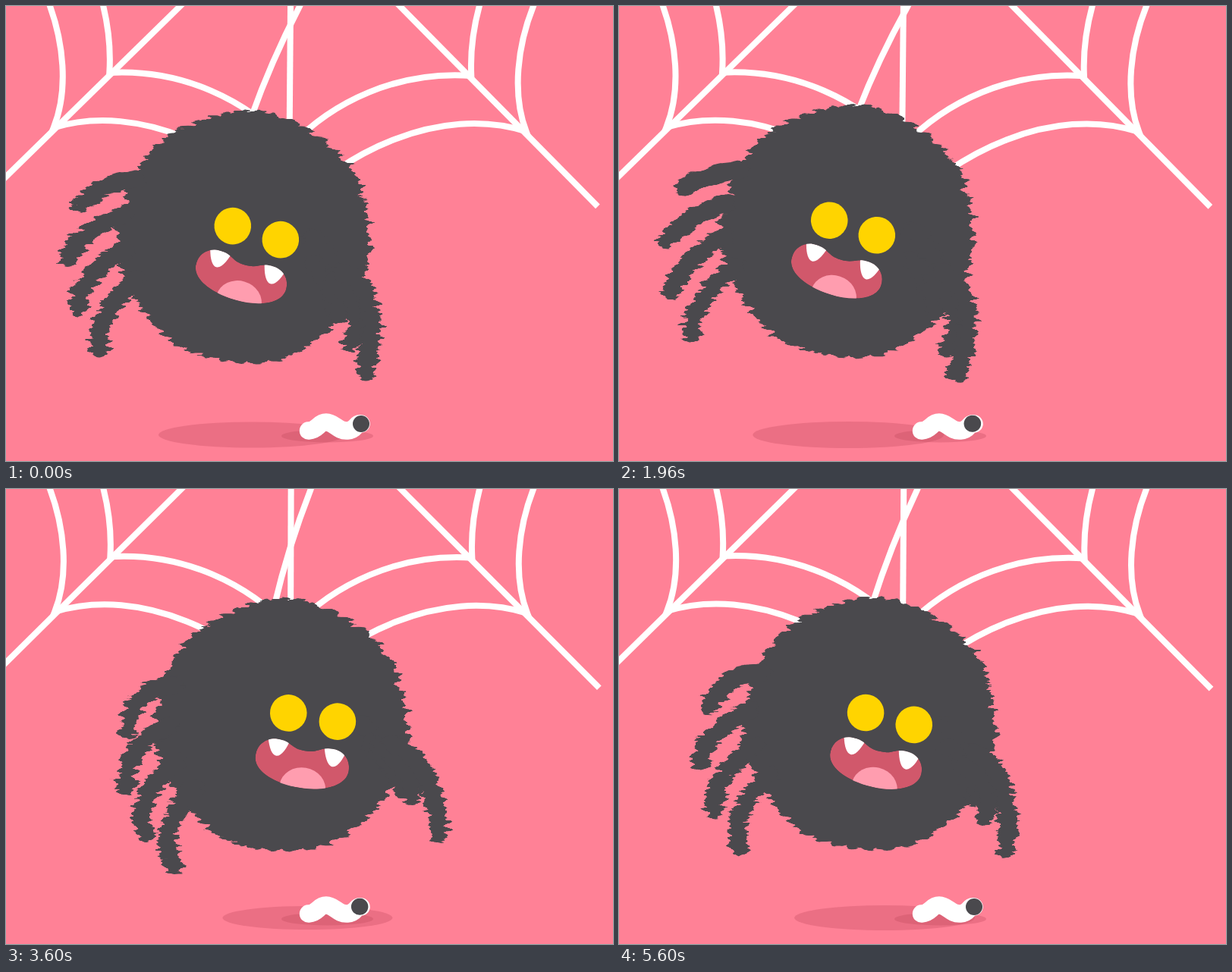
An HTML page that plays this animation: 800 px wide and 600 px high, repeating every 5.64 s.

```html
<!DOCTYPE html>
<html lang="en">
<head>
<meta charset="utf-8">
<title>Swinging spider</title>
<style>
  html, body { margin: 0; width: 100%; height: 100%; overflow: hidden; background: #ff8196; }
  svg { display: block; width: 100vw; height: 100vh; }
  .line { fill: none; stroke: #fff; stroke-width: 8; }
  .shade { fill: rgb(188, 69, 90); fill-opacity: .3; }
  .fur { fill: #4a494d; }
  .leg { fill: none; stroke: #4a494d; stroke-width: 24; stroke-linecap: round; }
  .worm { fill: none; stroke-linecap: round; }
</style>
</head>
<body>
<svg viewBox="0 0 800 600">
  <defs>
    <filter id="hair" filterUnits="userSpaceOnUse" x="-310" y="-240" width="620" height="500" color-interpolation-filters="sRGB">
      <feTurbulence type="fractalNoise" baseFrequency=".05 .2" numOctaves="2" seed="4"/>
      <feColorMatrix values="1 0 0 0 0  0 0 0 0 .5  0 0 0 0 .5  0 0 0 0 1" result="noise"/>
      <feDisplacementMap in="SourceGraphic" in2="noise" scale="24" xChannelSelector="R" yChannelSelector="G"/>
    </filter>
    <path id="lips" d="M-69 -4C-69 -26 -54 -37 -40 -37C-20 -37 -20 -25 1 -25C22 -25 22 -37 42 -36C56 -36 69.5 -24 69.5 -4C69.5 24 34 38 2 38C-34 38 -69 24 -69 -4Z"/>
    <clipPath id="inMouth"><use href="#lips"/></clipPath>
    <path id="tooth" d="M-16 -6C-13 10 -7 23 0 23C7 23 13 10 16 -6Z" fill="#fff"/>
    <g id="halfWeb">
      <path d="M262 -30L-30 261"/>
      <path d="M126 -10C136 25 140 55 138 90C235 84 320 125 376 185"/>
      <path d="M54 -10C79 50 84 115 65 163C180 127 310 195 376 270"/>
    </g>
  </defs>

  <g id="web" class="line">
    <use href="#halfWeb"/>
    <use href="#halfWeb" transform="translate(753 0) scale(-1 1)"/>
    <path d="M376 -20V240"/>
  </g>
  <path id="thread" class="line"/>
  <ellipse id="shadow" class="shade" cy="565.5"/>
  <ellipse class="shade" cx="423.5" cy="567" rx="60.5" ry="8.5"/>

  <g id="spider">
    <g id="coat" filter="url(#hair)"><path id="body" class="fur"/></g>
    <g id="face">
      <circle cx="-32.8" r="24.3" fill="#ffd400"/>
      <circle cx="32.8" r="24.3" fill="#ffd400"/>
      <g id="mouth">
        <g clip-path="url(#inMouth)">
          <use href="#lips" fill="#d1586b"/>
          <ellipse cx="7" cy="38" rx="34" ry="35" fill="#ff9daf"/>
          <use class="tooth" href="#tooth"/>
          <use class="tooth" href="#tooth"/>
        </g>
      </g>
    </g>
  </g>

  <path id="wormBody" class="worm" stroke="#fff" stroke-width="23.5"/>
  <path id="wormHead" class="worm" stroke="#4a494d" stroke-width="22"/>
</svg>

<script>
const LOOP = 5640, STEP = 40, SWING = 1890;
const $ = id => document.getElementById(id);
const set = (el, attrs) => { for (const k in attrs) el.setAttribute(k, attrs[k]); };

// Leg poses at four moments of a swing: knee x, knee y, tip x, tip y.
const POSE_TIMES = [70, 705, 1240, 1710];
const LEGS = [
  [[-182, -73, -215, -59], [-152, 37, -167, 51], [-105, 50, -120, 60], [-184, -37, -204, 6]],
  [[-207, -16, -238, 11], [-167, 79, -196, 103], [-105, 120, -90, 150], [-192, 33, -206, 80]],
  [[-207, 39, -232, 78], [-162, 110, -200, 136], [-92, 140, -80, 183], [-178, 93, -180, 142]],
  [[-192, 91, -206, 134], [-147, 137, -192, 159], [-63, 165, -61, 214], [-149, 138, -142, 184]],
  [[110, 30, 120, 55], [150, -15, 171, -2], [159, -101, 198, -81], [135, 30, 150, 50]],
  [[110, 80, 115, 105], [155, 48, 178, 65], [194, -48, 232, -36], [148, 60, 160, 85]],
  [[142, 112, 131, 154], [155, 87, 171, 111], [209, 1, 250, 5], [165, 65, 171, 93]],
  [[157, 100, 144, 187], [141, 122, 150, 151], [209, 44, 250, 53], [188, 63, 207, 143]]
];

const legs = LEGS.map(poses => {
  const el = document.createElementNS("http://www.w3.org/2000/svg", "path");
  set(el, { class: "leg" });
  $("coat").append(el);
  return { el, poses };
});
const teeth = [...document.querySelectorAll(".tooth")];

// Round body with a scalloped edge.
const rim = [];
for (let i = 0; i < 360; i++) {
  const a = i * Math.PI / 180;
  const r = 163.5 + 4.5 * Math.abs(Math.sin(23 * a + Math.sin(3 * a))) + 1.5 * Math.sin(7 * a + 1);
  rim.push((r * Math.cos(a)).toFixed(1) + " " + (r * Math.sin(a)).toFixed(1));
}
set($("body"), { d: "M" + rim.join("L") + "Z" });

const wormPath = "M370 551C380 549 386 561 399 560S411 549 422 549S437 561 450 560S460 549 468 551";
for (const id of ["wormBody", "wormHead"]) set($(id), { d: wormPath, pathLength: 1 });

function ease(from, to, t) {
  const k = Math.min(1, Math.max(0, (t - from) / (to - from)));
  return k * k * (3 - 2 * k);
}

// Smooth periodic curve through values at the pose times.
function spline(values, t) {
  const n = values.length;
  const at = i => values[(i + n) % n];
  const time = i => POSE_TIMES[(i + n) % n] + SWING * Math.floor(i / n);
  const slope = i => {
    const h0 = time(i) - time(i - 1), h1 = time(i + 1) - time(i);
    return ((at(i) - at(i - 1)) / h0 * h1 + (at(i + 1) - at(i)) / h1 * h0) / (h0 + h1);
  };
  let i = -1;
  while (time(i + 1) <= t) i++;
  const h = time(i + 1) - time(i), k = (t - time(i)) / h, k2 = k * k, k3 = k2 * k;
  return at(i) * (2 * k3 - 3 * k2 + 1) + at(i + 1) * (3 * k2 - 2 * k3)
    + h * (slope(i) * (k3 - 2 * k2 + k) + slope(i + 1) * (k3 - k2));
}

function trim(el, from, to) {
  set(el, { "stroke-dasharray": Math.max(.001, to - from) + " 3", "stroke-dashoffset": -from });
}

function drawLeg({ el, poses }, t) {
  const [kx, ky, tx, ty] = [0, 1, 2, 3].map(c => spline(poses.map(p => p[c]), t));
  const rx = kx * .78, ry = ky * .78 - 25;
  const cx = 2 * kx - (rx + tx) / 2, cy = 2 * ky - (ry + ty) / 2;
  set(el, { d: `M${rx} ${ry}Q${cx} ${cy} ${tx} ${ty}` });
}

function draw(t) {
  const a = t / SWING * 2 * Math.PI;
  const wave = shift => Math.cos(a - shift);

  const x = 394 - 102 * wave(.669);
  const y = 272.2 + 32.2 * wave(5.8) + 8 * Math.cos(2 * (a - 5.8));
  const tilt = 4.3 + 13.8 * wave(.56);
  set($("spider"), { transform: `translate(${x} ${y})` });
  set($("body"), { transform: `rotate(${tilt})` });
  legs.forEach(leg => drawLeg(leg, t));

  const fx = 14 + 39 * wave(4.88) + 4.5 * Math.cos(2 * (a - 4.9));
  const fy = -10 + 17 * wave(1.38) + 6 * Math.cos(2 * (a - 5.55));
  set($("face"), { transform: `translate(${fx} ${fy}) rotate(${tilt})` });

  const open = ease(150, 650, t) - ease(1300, 1800, t);
  const sx = .89 + .11 * open, sy = .76 + .24 * open;
  set($("mouth"), { transform: `translate(-4 ${64 + 11 * open}) scale(${sx} ${sy})` });
  teeth.forEach((el, i) => set(el, {
    transform: `translate(${i ? 45 : -39} ${i ? -36 : -38}) scale(${1 / sx} ${1 / sy})`
  }));

  set($("web"), { transform: `rotate(${.6 * wave(.669)} 376 -120)` });
  const top = 382 + 28 * wave(4.9), hook = 367 - 60 * wave(.748), end = y - 158;
  const lean = (hook - top) / end;
  set($("thread"), {
    d: `M${top - lean * 10} -10L${top} 0Q${(top + hook) / 2 - 6} ${end / 2} ${hook} ${end}l${lean * 25} 25`
  });

  const sweep = wave(.865);
  set($("shadow"), { cx: 412 - 136 * sweep, rx: 109.8 + 20 * sweep, ry: 15.3 + 2.7 * sweep });

  const look = 1 - ease(20, 680, t) + ease(1040, 1760, t);
  const size = .06 * (1 - look) + .3 * look * (1 - look);
  const tail = .28 * (1 - ease(200, 600, t) + ease(1300, 1700, t));
  const from = look * (1 - size), to = from + size;
  trim($("wormHead"), from, to);
  trim($("wormBody"), Math.min(tail, from), Math.max(tail + .72, to));
}

const start = performance.now();
function tick() {
  const now = (performance.now() - start) % LOOP;
  draw(Math.floor(now / STEP) * STEP % SWING);
  requestAnimationFrame(tick);
}
tick();
</script>
</body>
</html>
```
